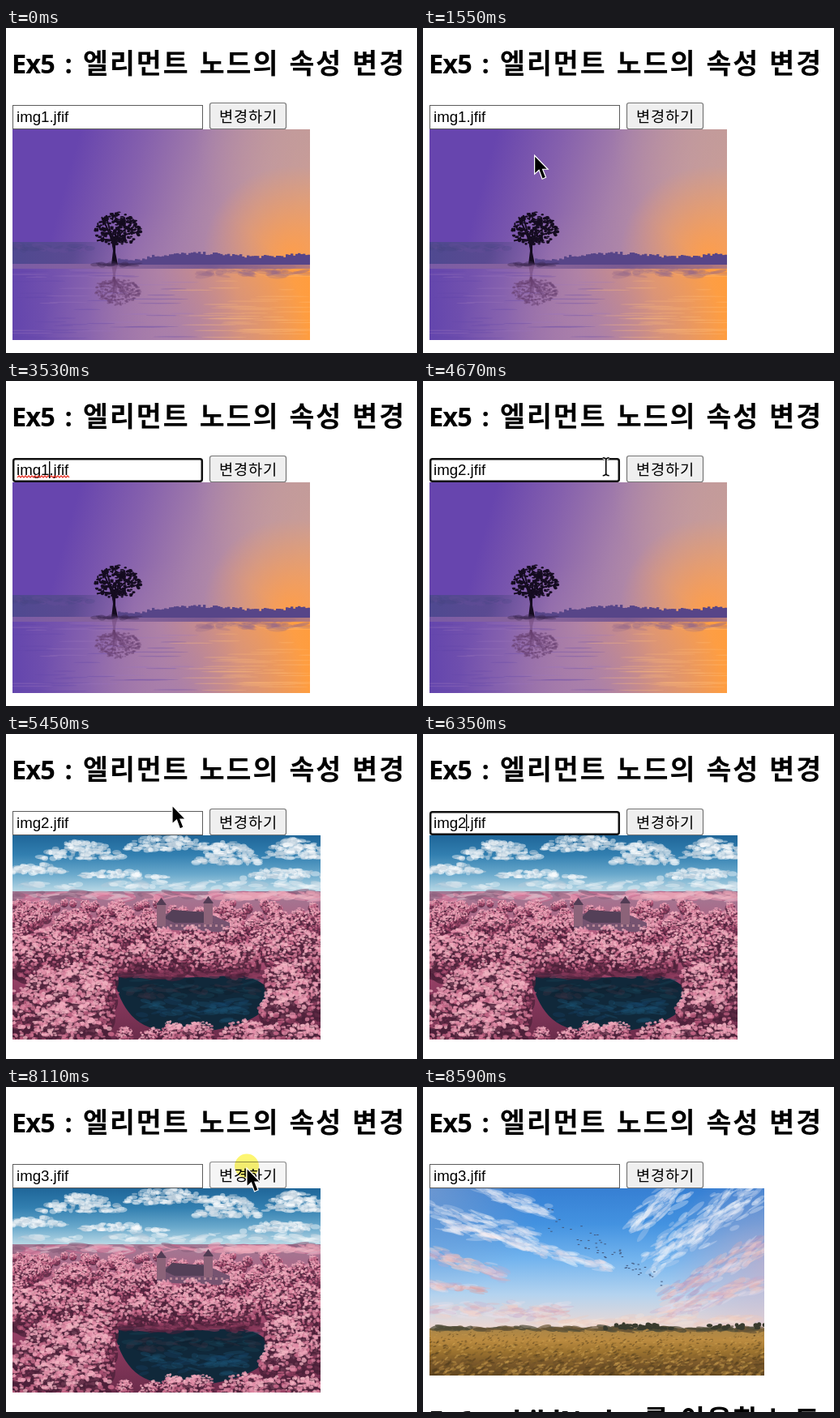
An HTML page with a canvas for the animation above (8990 ms loop, 507x401 px).

```html
<!DOCTYPE html>
<html lang="ko">
<head>
<meta charset="utf-8">
<title>속성 변경</title>
<style>
  html, body { margin: 0; width: 100%; height: 100%; overflow: hidden; background: #fff; }
  canvas { position: absolute; left: 8px; top: 125px; visibility: hidden; }
  svg { position: absolute; left: 0; top: 0; }
  .head { font: 700 33.6px "Noto Sans CJK KR", "Noto Sans CJK", sans-serif; letter-spacing: 2px; word-spacing: .7px; }
  .latin { font-family: "Noto Sans", sans-serif; font-size: 32.5px; letter-spacing: -.9px; word-spacing: 5px; }
  .field { font: 18.67px "Liberation Sans", Arial, sans-serif; }
  .label { font: 350 18.67px "Noto Sans CJK KR", "Noto Sans CJK", sans-serif; letter-spacing: .8px; }
  #press { mix-blend-mode: multiply; }
</style>
</head>
<body>
<canvas width="367" height="260"></canvas>
<canvas width="380" height="252"></canvas>
<canvas width="413" height="231"></canvas>
<svg width="507" height="401">
  <g class="head">
    <text class="latin" x="7" y="56">Ex5 :</text>
    <text x="95" y="56">엘리먼트 노드의 속성 변경</text>
    <g id="next">
      <text class="latin" x="7" y="423">Ex6 :</text>
      <text class="latin" x="95" y="423">childNodes</text>
      <text x="272" y="423">를 이용한</text>
      <text x="425" y="423">노드</text>
    </g>
  </g>
  <rect id="box" fill="#fff"/>
  <text id="value" class="field" x="13" y="116"></text>
  <path id="wave" fill="none" stroke="#e8352c" stroke-width="1.3"/>
  <rect id="caret" y="99" width="1.4" height="21"/>
  <rect id="button" x="251.5" y="92.5" width="94" height="32" rx="2.5" stroke-width="1.2"/>
  <text class="label" x="263" y="115.5">변경하기</text>
  <circle id="press" r="15" fill="#fdf672"/>
  <g id="pointer">
    <path id="arrow" d="M0 0V23L5.5 18 9.5 29 14 27 10 17H16.5Z" stroke="#fff" stroke-width="1.2"/>
    <g id="beam" fill="none">
      <path d="M-4-11Q0-11 0-8Q0-11 4-11M0-8V8M-4 11Q0 11 0 8Q0 11 4 11" stroke="#fff" stroke-width="3.4"/>
      <path d="M-4-11Q0-11 0-8Q0-11 4-11M0-8V8M-4 11Q0 11 0 8Q0 11 4 11" stroke="#000" stroke-width="1.6"/>
    </g>
  </g>
</svg>
<script>
const LOOP = 8990, STEP = 70;
const $ = id => document.getElementById(id);
const canvases = [...document.querySelectorAll('canvas')];

// ---- pictures ----
let seed = 7;
const rnd = () => (seed = (seed * 16807) % 2147483647) / 2147483647;
const between = (a, b) => a + (b - a) * rnd();
const pick = list => list[Math.floor(rnd() * list.length)];

function fill(g, x, y, w, h, [x0, y0, x1, y1], ...colors) {
  const grad = g.createLinearGradient(x0, y0, x1, y1);
  colors.forEach((c, i) => grad.addColorStop(i / (colors.length - 1), c));
  g.fillStyle = grad;
  g.fillRect(x, y, w, h);
}
function glow(g, x, y, r, color, w, h) {
  const grad = g.createRadialGradient(x, y, 0, x, y, r);
  grad.addColorStop(0, color);
  grad.addColorStop(1, color.slice(0, 7) + '00');
  g.fillStyle = grad;
  g.fillRect(0, 0, w, h);
}
function dab(g, x, y, rx, ry, color, alpha = 1, turn = 0) {
  g.globalAlpha = alpha;
  g.fillStyle = color;
  g.beginPath();
  g.ellipse(x, y, rx, ry, turn, 0, 7);
  g.fill();
  g.globalAlpha = 1;
}
function poly(g, color, ...p) {
  g.fillStyle = color;
  g.beginPath();
  for (let i = 0; i < p.length; i += 2) g.lineTo(p[i], p[i + 1]);
  g.fill();
}
function cloud(g, x, y, w, h, n, colors) {
  for (let i = 0; i < n; i++) {
    const u = rnd() + rnd() - 1, top = 1 - u * u;
    dab(g, x + u * w / 2, y - rnd() * top * h, between(2, 7), between(1, 3.5), pick(colors), .5);
  }
}
function streak(g, x0, y0, x1, y1, spread, n, colors, alpha = .3) {
  const turn = Math.atan2(y1 - y0, x1 - x0);
  for (let i = 0; i < n; i++) {
    const u = rnd(), off = (rnd() + rnd() - 1) * spread;
    dab(g, x0 + (x1 - x0) * u - Math.sin(turn) * off, y0 + (y1 - y0) * u + Math.cos(turn) * off,
      between(4, 14), between(1, 3.5), pick(colors), alpha, turn + between(-.3, .3));
  }
}

function drawTree(g, color, alpha) {
  g.globalAlpha = alpha;
  poly(g, color, 122, 167, 124, 150, 122, 132, 127, 132, 127, 152, 130, 167);
  g.strokeStyle = color;
  g.lineWidth = 2;
  for (let i = 0; i < 9; i++) {
    g.beginPath();
    g.moveTo(125, 146);
    g.quadraticCurveTo(between(120, 132), 132, 104 + i * 6, between(108, 138));
    g.stroke();
  }
  for (let i = 0; i < 230; i++) {
    const a = rnd() * 6.3, r = Math.sqrt(rnd());
    dab(g, 130 + Math.cos(a) * r * 28, 122 + Math.sin(a) * r * 20 + Math.abs(Math.cos(a)) * r * 3,
      between(1, 2.6), between(.8, 2), color, alpha);
  }
}

function drawDusk(g, w, h) {
  fill(g, 0, 0, w, 167, [70, 50, 375, 135], '#6745ae', '#8560ad', '#a680aa', '#c4979f', '#dfa489');
  glow(g, 365, 10, 140, '#c09b9bcc', w, 166);
  glow(g, 345, 155, 110, '#ff9d48ee', w, 166);
  fill(g, 0, 139, 150, 28, [0, 0, 150, 0], '#4f4990', '#5b4a92', '#6f559a00');
  streak(g, 0, 146, 100, 146, 5, 25, ['#6b4e9b', '#494586']);
  fill(g, 0, 166, w, h - 166, [0, 200, w, 175], '#6446ad', '#7f5bae', '#b785a0', '#f6a05c', '#ff9d3e');
  glow(g, 200, 262, 165, '#a47daecc', w, h);
  for (let i = 0; i < 95; i++) {
    const y = between(170, h), x = between(0, w);
    dab(g, x, y, between(10, 40), .7, x > 215 ? '#ffbd7a' : pick(['#9b77bb', '#6244a8']), .32);
  }
  fill(g, 0, 166, w, 6, [0, 0, w, 0], '#7a5ba5', '#8a659c', '#7a5a90', '#b67b7b');
  // far shore
  g.fillStyle = '#574588';
  for (let x = 130; x < w; x += 3) {
    const tall = x < 165 ? 4 : 7 + 4 * Math.sin((x - 150) / 50) ** 2;
    const top = 166 - tall - between(0, 4);
    g.fillRect(x, top, 3.3, 167 - top);
  }
  streak(g, 235, 176, w, 176, 6, 45, ['#93678a'], .25);
  drawTree(g, '#150c20', 1);
  g.save();
  g.translate(0, 299);
  g.scale(1, -.8);
  drawTree(g, '#684070', .45);
  g.restore();
  streak(g, 100, 167, 158, 167, 1, 10, ['#3c2752'], .4);
}

function bush(g, x, y, r) {
  dab(g, x, y + r * .3, r, r, '#4b2039', .75);
  for (let i = 0; i < 75; i++) {
    const a = rnd() * 6.3, d = Math.sqrt(rnd()) * r, dx = Math.cos(a) * d, dy = Math.sin(a) * d;
    const shade = dy / r + dx / r * .3 + between(-.4, .4);
    const tone = shade < -.25 ? ['#eda3b8', '#e18ba5', '#f2b4c2'] :
      shade < .3 ? ['#d17593', '#c06082', '#de87a2'] : ['#8d3c5e', '#a54b6d', '#70304f'];
    dab(g, x + dx, y + dy, .5 + between(.04, .13) * r, .4 + between(.03, .1) * r, pick(tone), .75);
  }
}
function grove(g, n, x0, y0, x1, y1, r0, r1) {
  for (let i = 0; i < n; i++) {
    const u = i / n;
    bush(g, between(x0, x1), y0 + (y1 - y0) * u, (r0 + (r1 - r0) * u) * between(.8, 1.2));
  }
}

function drawForest(g, w, h) {
  fill(g, 0, 0, w, 72, [0, 0, 0, 72], '#1f6699', '#327fb0', '#6aa9cc', '#c4dfe9');
  const white = ['#ffffff', '#eef4f8', '#b9cbda', '#dce8ef'];
  cloud(g, 85, 29, 110, 22, 140, white);
  cloud(g, 190, 19, 130, 19, 120, white);
  cloud(g, 265, 35, 85, 28, 140, white);
  cloud(g, 350, 28, 85, 25, 130, white);
  cloud(g, 30, 47, 85, 12, 70, white);
  cloud(g, 130, 53, 130, 10, 70, white);
  cloud(g, 335, 53, 120, 12, 90, white);
  streak(g, 0, 62, w, 62, 6, 80, white, .4);
  fill(g, 0, 69, w, h - 69, [0, 69, 0, h], '#a17a95', '#b5577a', '#8d3b60', '#6b2c4b');
  streak(g, 0, 75, w, 75, 6, 140, ['#e79ab2', '#c96a8f', '#8c5f7c', '#dab7c6'], .6);
  streak(g, 260, 76, w, 74, 4, 50, ['#efb3c1', '#e6a0b3'], .6);
  grove(g, 145, 0, 83, w, 118, 5, 11);
  // manor
  poly(g, '#765370', 178, 116, 178, 101, 197, 94, 237, 94, 268, 108, 268, 120);
  poly(g, '#544058', 187, 102, 197, 92, 237, 95, 248, 108, 200, 108);
  [[178, 83], [236, 81]].forEach(([x, y]) => {
    g.fillStyle = '#8c6379';
    g.fillRect(x, y, 11, 29);
    poly(g, '#523c54', x - 1, y + 3, x + 5.5, y - 6, x + 12, y + 3);
  });
  g.fillStyle = '#b48494';
  for (let x = 194; x < 262; x += 7) g.fillRect(x, 110, 3, 3);
  grove(g, 95, 0, 122, w, 160, 12, 18);
  g.fillStyle = '#10283a';
  g.beginPath();
  g.moveTo(124, 174);
  g.bezierCurveTo(150, 164, 190, 180, 240, 174);
  g.bezierCurveTo(290, 166, 322, 182, 317, 204);
  g.bezierCurveTo(312, 226, 260, 246, 200, 243);
  g.bezierCurveTo(150, 240, 135, 215, 124, 174);
  g.fill();
  streak(g, 145, 190, 300, 190, 14, 65, ['#0d1d2c', '#1b4659', '#3a3042'], .35);
  streak(g, 155, 215, 290, 215, 15, 60, ['#1f587c', '#17476a'], .3);
  streak(g, 130, 173, 312, 173, 4, 60, ['#4b2039', '#8d3c5e'], .5);
  grove(g, 24, 0, 172, 112, 215, 18, 24);
  grove(g, 17, 326, 170, w, 225, 17, 24);
  grove(g, 17, 0, 218, 130, 254, 20, 24);
  grove(g, 10, 195, 241, 245, 255, 14, 18);
  grove(g, 15, 258, 244, w, 258, 16, 22);
  grove(g, 6, 130, 244, 200, 254, 8, 11);
}

function drawField(g, w, h) {
  fill(g, 0, 0, w, 175, [0, 0, 0, 175], '#367fd3', '#4392e0', '#73b4ee', '#b4d3ef', '#f2d9d1');
  glow(g, 0, 0, 135, '#7e9fd0bb', w, 175);
  glow(g, w, 95, 120, '#cfaec4aa', w, 175);
  const pale = ['#ffffff', '#e4e9f6', '#cad7ef'], pink = ['#e5b0b3', '#f4d0c8', '#c7aac9', '#eae0eb'];
  streak(g, 0, 25, 130, 62, 12, 110, ['#a9b9dd', ...pale]);
  streak(g, 20, 45, 220, 98, 8, 140, ['#f5dfe0', ...pale]);
  streak(g, 60, 0, 150, 30, 10, 60, pale);
  streak(g, 0, 80, 90, 106, 12, 90, ['#b7b4db', ...pink]);
  streak(g, 0, 119, 65, 125, 5, 45, ['#e9968c', ...pink]);
  streak(g, 0, 150, 170, 152, 13, 110, pink);
  streak(g, 400, 0, 270, 95, 28, 200, pale);
  streak(g, 310, 0, 250, 48, 18, 75, pale);
  streak(g, w, 68, 290, 135, 15, 140, ['#aa92bd', ...pink]);
  streak(g, w, 115, 285, 155, 13, 120, pink);
  streak(g, 130, 165, w, 163, 7, 100, ['#f9e4d6', '#efc9bc']);
  // birds
  g.fillStyle = '#42577c';
  for (let i = 0; i < 55; i++) {
    const u = rnd();
    g.fillRect(145 + u * 145, 35 + u * 82 + between(-17, 17) * (1 - u * .6), 2.5, 1);
  }
  fill(g, 0, 173, w, h - 173, [0, 173, 0, h], '#a88549', '#bb8b40', '#9b722f', '#79572a', '#624720');
  for (let i = 0; i < 1500; i++) {
    const u = rnd(), y = 176 + u * 55;
    dab(g, rnd() * w, y, 1 + u * 3, .5 + u, pick(['#d0a451', '#4e391c', '#856329', '#b98c43', '#634b25']), .5, between(-.8, .1));
  }
  streak(g, 0, 173, w, 174, 1.5, 90, ['#4d4a36', '#695536'], .7);
  for (let i = 0; i < 60; i++) dab(g, i < 42 ? between(215, 303) : between(345, w), between(168, 173), between(2, 4), between(1.5, 3), '#393b2e');
}

[drawDusk, drawForest, drawField].forEach((draw, i) => {
  const c = canvases[i];
  draw(c.getContext('2d'), c.width, c.height);
});

// ---- timeline ----
const text = [[0, 'img1.jfif'], [3800, 'img.jfif'], [4000, 'img2.jfif'], [6890, 'img.jfif'], [7090, 'img3.jfif']];
const caret = [[0, 0], [1900, 53], [2450, 43], [3200, 0], [3530, 53], [3800, 43], [4000, 53], [4530, 0],
  [6070, 53], [6620, 0], [6890, 43], [7090, 53], [7550, 0]];
const focus = [[0, 0], [1900, 1], [4900, 0], [6070, 1], [8040, 0]];
const wave = [[0, 0], [1980, 1], [3800, 0]];
const picture = [[0, 0], [5030, 1], [8180, 2]];
const button = [[0, 'idle'], [4810, 'hover'], [5000, 'down'], [5100, 'hover'], [5240, 'idle'],
  [7760, 'hover'], [8040, 'down'], [8180, 'hover'], [8320, 'idle']];
const look = { idle: ['#efefef', '#767676'], hover: ['#e5e5e5', '#4f4f4f'], down: ['#f5f5f5', '#8d8d8d'] };
const clicks = [[1830, 1980], [2450, 2730], [4900, 5030], [6070, 6220], [8040, 8180]];
const moves = [
  { end: 1980, keys: [[1060, 383, 365], [1760, 70, 100], [1900, 60, 100]] },
  { end: 2730, keys: [[1980, 60, 101], [2450, 47, 112]] },
  { end: 2870, keys: [[2730, 62, 107], [2800, 206, 99]] },
  { end: 5450, keys: [[4530, 206, 105], [4880, 262, 107], [5170, 262, 107], [5380, 225, 84]] },
  { end: 6350, keys: [[5450, 205, 88], [5940, 51, 117], [6150, 51, 115], [6290, 122, 106]] },
  { end: 8590, keys: [[7550, 122, 106], [7840, 297, 100], [8180, 297, 100], [8520, 440, 401]] }
];

const at = (track, t) => track.reduce((v, [start, value]) => t >= start ? value : v, track[0][1]);
const set = (el, attrs) => { for (const k in attrs) el.setAttribute(k, attrs[k]); };
const show = (el, on) => { el.style.visibility = on ? 'visible' : 'hidden'; };
const ease = u => u * u * (3 - 2 * u);

// The pointer is sampled every STEP ms along an eased path.
function pointerAt(t) {
  const move = moves.find(m => t >= m.keys[0][0] && t < m.end);
  if (!move) return null;
  const { keys } = move, start = keys[0][0];
  const s = start + Math.floor((t - start) / STEP) * STEP;
  const i = keys.findIndex(k => k[0] > s);
  if (i < 0) return keys[keys.length - 1].slice(1);
  const [t0, x0, y0] = keys[i - 1], [t1, x1, y1] = keys[i], u = ease((s - t0) / (t1 - t0));
  return [x0 + (x1 - x0) * u, y0 + (y1 - y0) * u];
}

let squiggle = 'M14 119';
for (let x = 14; x < 77; x += 4) squiggle += 'l2-2l2 2';
set($('wave'), { d: squiggle });

function render(t) {
  const pic = at(picture, t), bar = at(caret, t), p = pointerAt(t);
  canvases.forEach((c, i) => show(c, i === pic));
  show($('next'), pic === 2);
  $('value').textContent = at(text, t);
  show($('wave'), at(wave, t));
  show($('caret'), bar);
  set($('caret'), { x: bar });
  set($('box'), at(focus, t)
    ? { x: 9.2, y: 96.2, width: 232.6, height: 27.6, rx: 2.5, stroke: '#101010', 'stroke-width': 2.5 }
    : { x: 8.5, y: 95.5, width: 234, height: 29, rx: 0, stroke: '#5c5c5c', 'stroke-width': 1 });
  const [face, edge] = look[at(button, t)];
  set($('button'), { fill: face, stroke: edge });

  const inField = p && p[0] < 243 && p[1] > 95 && p[1] < 125;
  show($('arrow'), p && !inField);
  show($('beam'), inField);
  show($('press'), p && clicks.some(([a, b]) => t >= a && t < b));
  if (!p) return;
  set($('pointer'), { transform: `translate(${p})` });
  set($('press'), { cx: p[0], cy: p[1] - (inField ? 0 : 2.5) });
}

const origin = performance.now();
function tick() {
  render((performance.now() - origin) % LOOP);
  requestAnimationFrame(tick);
}
tick();
</script>
</body>
</html>
```
